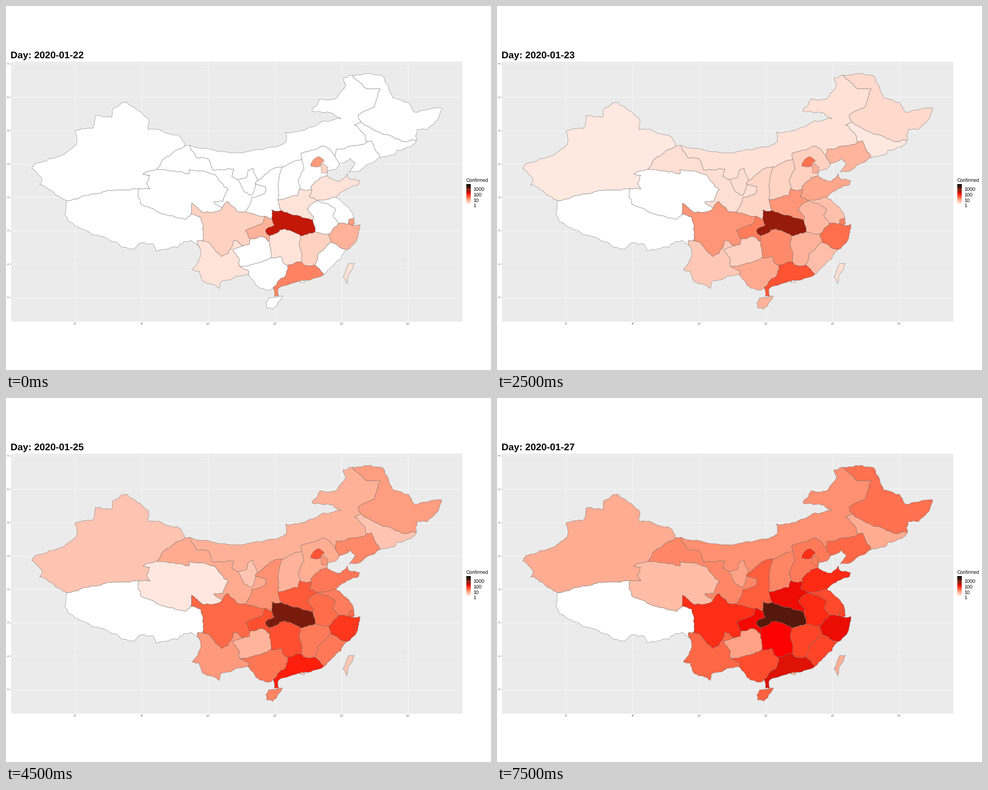
These frames come from a looping animation (864x648 px, 8 s). A matplotlib script:

```python
import math
import random
from itertools import combinations

import numpy as np
import matplotlib.pyplot as plt
from matplotlib.animation import FuncAnimation
from matplotlib.patches import Polygon, Rectangle

W, H, DPI = 864, 648, 100
FRAMES, STEP, PER_DAY = 16, 500, 3
LAST_DAY = (FRAMES - 1) / PER_DAY
PX = 72 / DPI

plt.rcParams["font.family"] = "Liberation Sans"
plt.rcParams["text.hinting"] = "none"
rng = random.Random(4)


# --- Geometry: corners where regions meet, plus the main bends between them

corners, bends, islands = [], {}, {}


def pairs(xy):
    return list(zip(xy[::2], xy[1::2]))


def meet(regions, x, y):
    """A corner shared by several regions; "-" is the outside."""
    corners.append((set(regions.split()), (x, y)))


def bend(regions, *xy):
    bends[frozenset(regions.split())] = pairs(xy)


def island(code, *xy):
    islands[code] = pairs(xy + xy[:2])


def length(pts):
    return sum(math.dist(p, q) for p, q in zip(pts, pts[1:]))


def roughen(pts, levels=3):
    """Midpoint displacement: break straight runs into irregular steps."""
    for _ in range(levels):
        out = [pts[0]]
        for (x0, y0), (x1, y1) in zip(pts, pts[1:]):
            d = math.hypot(x1 - x0, y1 - y0)
            if d > 4:
                k = rng.uniform(-1, 1) * min(0.14, 2 / d)
                out.append(((x0 + x1) / 2 - k * (y1 - y0),
                            (y0 + y1) / 2 + k * (x1 - x0)))
            out.append((x1, y1))
        pts = out
    return pts


def make_borders():
    """Join every two corners that have the same two neighbours."""
    codes = sorted(set().union(*(r for r, _ in corners)))
    borders = []
    for pair in map(frozenset, combinations(codes, 2)):
        ends = [p for regions, p in corners if pair <= regions]
        if len(ends) == 2:
            mid = bends.get(pair, [])
            path = min(([a, *mid, b] for a, b in (ends, ends[::-1])), key=length)
            borders.append((pair, roughen(path)))
    return borders


def outline(code, borders):
    """Chain all borders of a region end to end."""
    if code in islands:
        return roughen(islands[code])
    parts = [p for pair, p in borders if code in pair]
    ring = list(parts.pop())
    while parts:
        i = next(i for i, p in enumerate(parts) if ring[-1] in (p[0], p[-1]))
        p = parts.pop(i)
        ring += (p if p[0] == ring[-1] else p[::-1])[1:]
    return ring


meet("XJ XZ -", 108, 347)
meet("XJ GS -", 319, 249)
meet("XJ GS QH", 269, 291)
meet("XJ QH XZ", 238, 325)
meet("GS IM -", 328, 248)
meet("XZ QH SC", 330, 371)
meet("XZ SC YN", 350, 418)
meet("XZ YN -", 344, 428)
meet("YN GX -", 432, 479)
meet("YN GZ GX", 415, 463)
meet("YN SC GZ", 423, 427)
meet("SC GZ CQ", 435, 415)
meet("GZ CQ HN", 469, 419)
meet("GZ HN GX", 472, 448)
meet("GX HN GD", 502, 462)
meet("GX GD -", 476, 501)
meet("HN JX GD", 526, 456)
meet("JX GD FJ", 550, 461)
meet("GD FJ -", 566, 478)
meet("JX FJ ZJ", 579, 420)
meet("ZJ FJ -", 607, 434)
meet("AH ZJ JX", 575, 406)
meet("AH JS ZJ", 593, 387)
meet("JS SH ZJ", 609, 388)
meet("SH ZJ -", 617, 391)
meet("JS SH -", 620, 378)
meet("SD JS -", 588, 341)
meet("HA SD JS AH", 555, 346)
meet("HE HA SD", 545, 328)
meet("HA AH HB", 546, 381)
meet("HA HB SN", 490, 364)
meet("SN HB CQ", 474, 380)
meet("HB CQ HN", 470, 409)
meet("HB HN JX", 525, 409)
meet("HB JX AH", 551, 402)
meet("SC CQ SN", 461, 374)
meet("SC SN GS", 427, 367)
meet("SC GS QH", 385, 360)
meet("GS IM NX", 413, 309)
meet("IM NX SN", 448, 311)
meet("NX SN GS", 444, 316)
meet("IM SN SX", 492, 287)
meet("SN SX HA", 484, 345)
meet("SX HA HE", 524, 325)
meet("IM SX HE", 527, 273)
meet("IM HE LN", 586, 267)
meet("HE LN -", 594, 281)
meet("HE SD -", 572, 302)
meet("LN JL -", 666, 270)
meet("IM LN JL", 643, 242)
meet("JL HL -", 731, 240)
meet("IM JL HL", 632, 206)
meet("IM HL -", 617, 123)

bend("XJ -", 82, 329, 60, 319, 64, 309, 46, 290, 51, 281, 104, 264, 125, 247, 123, 222,
     154, 218, 159, 195, 188, 198, 190, 183, 206, 172, 216, 172, 253, 200, 253, 220, 305, 229)
bend("IM -", 410, 261, 480, 251, 500, 240, 498, 224, 520, 224, 562, 206, 597, 201,
     583, 191, 545, 187, 560, 165, 585, 166, 605, 139, 600, 128)
bend("HL -", 640, 120, 672, 125, 689, 164, 716, 171, 727, 189, 776, 181, 764, 208,
     751, 220, 732, 220)
bend("XZ -", 330, 417, 318, 419, 305, 430, 267, 436, 263, 424, 241, 421, 229, 432,
     202, 425, 168, 410, 133, 396, 110, 382, 105, 371)
bend("YN -", 404, 485, 382, 492, 380, 503, 352, 491, 345, 472, 332, 470, 346, 446)
bend("SD -", 595, 312, 608, 299, 612, 308, 630, 311, 628, 318, 607, 325)
bend("JL -", 722, 250, 697, 256, 694, 263)
bend("LN -", 632, 292, 611, 296, 622, 279, 613, 271)
bend("HE -", 587, 291, 574, 292)
bend("JS -", 608, 357)
bend("SH -", 621, 387)
bend("ZJ -", 631, 389, 625, 416)
bend("FJ -", 597, 450)
bend("GD -", 527, 490, 485, 503, 486, 516, 478, 517)
bend("GX -", 470, 506, 446, 498)

bend("XJ XZ", 160, 335, 187, 329)
bend("XJ GS", 302, 257, 278, 275)
bend("XJ QH", 244, 299, 256, 301, 250, 316, 257, 325)
bend("XZ QH", 235, 338, 240, 352, 284, 371, 320, 380)
bend("XZ SC", 347, 376)
bend("XZ YN", 341, 418)
bend("QH GS", 326, 299, 326, 291, 372, 300, 396, 327, 386, 348, 370, 349)
bend("QH SC", 375, 366, 350, 367, 331, 351)
bend("SC GS", 395, 348, 411, 365)
bend("SC CQ", 459, 384, 426, 400)
bend("SC GZ", 434, 424)
bend("SC YN", 406, 417, 395, 441, 384, 446, 361, 420)
bend("YN GZ", 404, 434, 416, 452)
bend("YN GX", 433, 473)
bend("GZ CQ", 455, 410)
bend("GZ GX", 440, 460)
bend("GS IM", 340, 270, 361, 273, 368, 292, 406, 290, 402, 303)
bend("GS NX", 425, 331, 438, 337)
bend("NX IM", 428, 306, 432, 292, 440, 289)
bend("GS SN", 463, 322, 461, 334, 438, 341)
bend("IM SN", 476, 290)
bend("SN SX", 486, 310)
bend("SN HB", 473, 363)
bend("SX HE", 531, 291, 522, 307)
bend("SX HA", 519, 338)
bend("IM HE", 526, 262, 538, 259, 566, 249, 576, 254)
bend("IM LN", 588, 255, 622, 249)
bend("LN JL", 651, 240)
bend("IM JL", 639, 229, 621, 212)
bend("JL HL", 664, 224, 704, 240)
bend("IM HL", 627, 194, 656, 179, 667, 148, 640, 146)
bend("HE SD", 543, 322, 560, 305)
bend("HA SD", 540, 339)
bend("HA AH", 536, 362, 548, 375)
bend("HA HB", 524, 374, 508, 371)
bend("JS AH", 573, 352, 587, 363, 582, 372)
bend("JS SH", 611, 380)
bend("ZJ AH", 585, 394)
bend("JX FJ", 555, 443)
bend("JX GD", 530, 461)
bend("HB JX", 541, 404)
bend("HB HN", 514, 403, 488, 398)
bend("HB CQ", 462, 400, 478, 391)
bend("HN GD", 515, 457)
bend("HN GX", 494, 457, 490, 446)
bend("GX GD", 494, 484)

island("BJ", 543, 285, 546, 276, 557, 268, 567, 276, 560, 285)
island("TJ", 561, 284, 565, 280, 574, 287, 572, 297, 562, 297)
island("HK", 523, 492, 526, 488, 533, 489, 531, 493)
island("HI", 463, 528, 468, 519, 493, 516, 482, 534, 475, 540, 464, 537)
island("TW", 600, 482, 610, 459, 621, 458, 607, 494)


# --- Case levels on a log scale: 0 white, 1 red, 2 black

levels = {}


def grow(code, first, last, start=0.0, ease=1.4):
    """Level rises from first to last, slowing down towards the final day."""
    def at(day):
        s = max(0, (day - start) / (LAST_DAY - start))
        return first + (last - first) * (1 - (1 - s) ** ease)
    levels[code] = at


for code, last in dict(XJ=.43, GS=.61, IM=.57, HL=.71, JL=.43, SN=.79).items():
    grow(code, 0, last, start=1, ease=1.8)
for code, last in dict(JS=.86, AH=.95, FJ=.88).items():
    grow(code, 0, last, start=.7, ease=1.9)
for code, last in dict(HE=.67, SX=.62, NX=.48).items():
    grow(code, 0, last, ease=1.1)
for code, last in dict(LN=.75, GZ=.48, GX=.85, HI=.77).items():
    grow(code, 0, last, ease=1.8)
grow("XZ", 0, 0)
grow("QH", 0, .35, start=1.9, ease=1)
grow("HK", 0, .4, start=1.2, ease=1.8)
grow("TW", .15, .41, start=1.5)
grow("YN", .15, .75, start=1)
grow("JX", .24, .88, start=1, ease=1.6)
grow("HN", .15, 1.01, ease=1.8)
grow("HA", .15, 1.06)
grow("SD", .15, .95, ease=1.2)
grow("SC", .24, .94)
grow("CQ", .4, 1.04, ease=1.3)
grow("ZJ", .4, 1.07, ease=1.6)
grow("GD", .63, 1.12, ease=1.3)
grow("HB", 1.22, 1.65, ease=1.2)
grow("SH", .5, .87, ease=1.1)
grow("BJ", .52, .94)
grow("TJ", .23, .66)


def shade(u):
    """White, red, black blended in CIE Lab."""
    L, a, b = [np.interp(u, [0, 1, 2], v)
               for v in ([100, 53.24, 0], [0, 80.09, 0], [0, 67.2, 0])]
    fy = (L + 16) / 116
    xyz = [t ** 3 if t > 6 / 29 else (t - 4 / 29) * 3 * (6 / 29) ** 2
           for t in (fy + a / 500, fy, fy - b / 200)]
    m = np.array([[3.2406, -1.5372, -.4986],
                  [-.9689, 1.8758, .0415],
                  [.0557, -.2040, 1.0570]])
    rgb = np.clip(m @ (np.array(xyz) * [.9505, 1, 1.089]), 0, 1)
    return np.where(rgb <= .0031308, 12.92 * rgb,
                    1.055 * rgb ** (1 / 2.4) - .055).clip(0, 1)


# --- Drawing

fig = plt.figure(figsize=(W / DPI, H / DPI), dpi=DPI, facecolor="white")
ax = fig.add_axes([0, 0, 1, 1])
ax.axis("off")


def text(x, y, s, size, **kw):
    return ax.text(x, y, s, fontsize=size * PX, va="baseline", **kw)


def line(xs, ys, color, width):
    ax.plot(xs, ys, color=color, lw=width * PX, solid_capstyle="butt")


LEFT, RIGHT, TOP, BOTTOM = 8.5, 813, 98.5, 561.5
ax.add_patch(Rectangle((LEFT, TOP), RIGHT - LEFT, BOTTOM - TOP, fc="#EBEBEB", lw=0))
for lon in range(80, 131, 10):
    x = 123 + (lon - 80) * 11.865
    line([x, x], [TOP, BOTTOM], "white", 0.6)
    line([x, x], [BOTTOM, BOTTOM + 1.5], "#555555", 0.6)
    text(x, 567.4, str(lon), 4, ha="center", color="#4D4D4D")
for lat in range(20, 56, 5):
    y = 518.5 - (lat - 20) * 11.875
    line([LEFT, RIGHT], [y, y], "white", 0.6)
    line([LEFT - 1.5, LEFT], [y, y], "#555555", 0.6)
    text(6.6, y + 1.5, str(lat), 4, ha="right", color="#4D4D4D")

text(819.7, 313.3, "Confirmed", 8.6)
ramp = np.array([[shade(u)] for u in np.linspace(2, 0, 72)])
ax.imshow(ramp, extent=(820, 828, 354.5, 318), aspect="auto", interpolation="bilinear")
for power in range(4):
    y = 354.5 - power * 9.6
    line([820, 821.6], [y, y], "white", 0.6)
    line([826.4, 828], [y, y], "white", 0.6)
    text(832, y + 3.6, str(10 ** power), 9)

title = text(7.9, 93, "", 17.2, weight="bold")
borders = make_borders()
shapes = {code: ax.add_patch(Polygon(outline(code, borders), ec="#666666", lw=0.45 * PX,
                                     joinstyle="round", zorder=3))
          for code in sorted(levels, key=lambda c: c in islands)}
ax.set_xlim(0, W)
ax.set_ylim(H, 0)


def update(i):
    title.set_text(f"Day: 2020-01-{22 + i // PER_DAY}")
    for code, patch in shapes.items():
        patch.set_facecolor(shade(levels[code](i / PER_DAY)))
    return [title, *shapes.values()]


anim = FuncAnimation(fig, update, frames=FRAMES, interval=STEP, repeat=True,
                     repeat_delay=0, blit=False)
plt.show()
```
